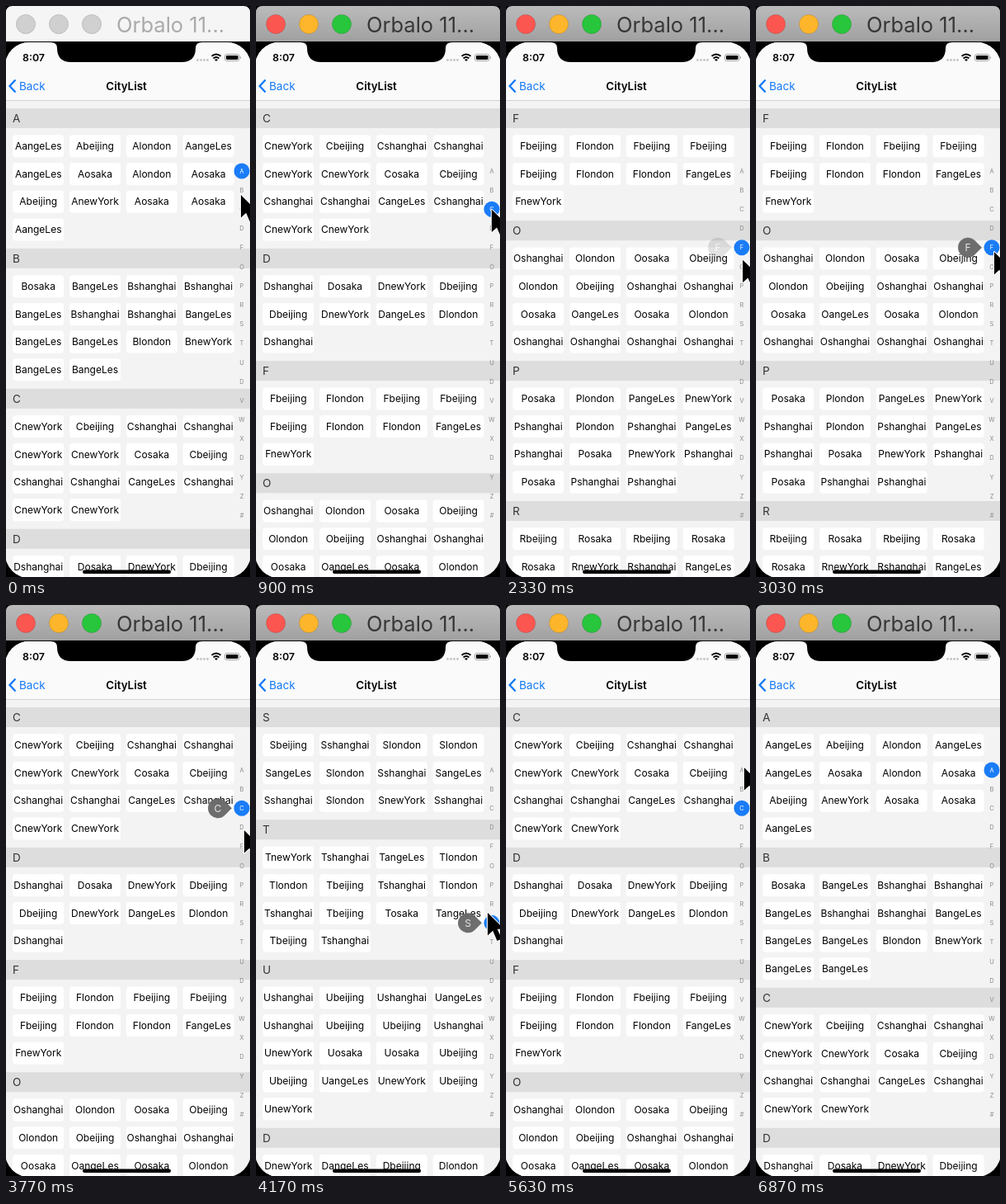
Write an HTML page that moves like this. It is 296 px wide and 692 px high and loops after 6910 ms.

```html
<!DOCTYPE html>
<html lang="en">
<head>
<meta charset="utf-8">
<title>CityList</title>
<style>
  html, body { margin: 0; height: 100%; overflow: hidden; background: #000; }
  svg { display: block; font-family: Inter, Roboto, "Liberation Sans", sans-serif; }
  .mid { text-anchor: middle; }
  .card { font-size: 12px; fill: #000; }
  .head { font-size: 13.5px; fill: #333; }
  .index { font-size: 7.5px; fill: #8b8b8f; }
  .bold { font-weight: 600; }
</style>
</head>
<body>
<svg width="296" height="692" viewBox="0 0 296 692">
  <defs>
    <linearGradient id="active" x2="0" y2="1">
      <stop stop-color="#bcbbbc"/><stop offset="1" stop-color="#a1a0a1"/>
    </linearGradient>
    <clipPath id="phone"><rect x="-1" y="44" width="298" height="649" rx="29"/></clipPath>
  </defs>

  <path id="bar" d="M0 43V8Q0 0 8 0H288Q296 0 296 8V43Z"/>
  <g id="lights"></g>
  <text id="caption" x="134" y="32" font-size="25.5">Orbalo 11...</text>

  <g clip-path="url(#phone)">
    <rect y="44" width="296" height="648" fill="#f3f3f4"/>
    <g id="list"></g>
    <rect y="44" width="296" height="70" fill="#fafafa"/>
    <rect y="114" width="296" height="1" fill="#d2d2d3"/>
    <path d="M54 44Q62 44 62 51Q62 68 79 68H213Q230 68 230 51Q230 44 238 44Z"/>
    <text class="mid bold" x="33.5" y="66.7" font-size="12.4">8:07</text>
    <path d="M232.5 65.5H245" stroke="#c4c4c4" stroke-width="2.8" stroke-linecap="round" stroke-dasharray="0 4"/>
    <path d="M249.5 60.8Q255 56 260.5 60.8M251.6 63.4Q255 60.6 258.4 63.4" fill="none" stroke="#000" stroke-width="1.9"/>
    <path d="M253 65Q255 63.5 257 65L255 67Z"/>
    <rect x="265.5" y="58.5" width="17.5" height="8" rx="2.4" fill="none" stroke="#999" stroke-width=".9"/>
    <rect x="267" y="60" width="14.5" height="5" rx="1.2"/>
    <path d="M284 61Q286 62.5 284 64Z" fill="#999"/>
    <path d="M11.5 89.5L4.5 97L11.5 104.5" fill="none" stroke="#1479f7" stroke-width="2.3"/>
    <text x="16" y="102" font-size="13.5" fill="#1479f7">Back</text>
    <text class="mid bold" x="146" y="102" font-size="13.4">CityList</text>
    <circle id="dot" cx="286" r="9.5" fill="#1a7cf7"/>
    <g id="index"></g>
    <g id="bubble">
      <path d="M274 0L265.5 -8.5A12 12 0 1 0 265.5 8.5Z" fill="#696969" fill-opacity=".96"/>
      <text id="letter" class="mid" x="257" y="4.3" font-size="12" fill="#e6e6e6"></text>
    </g>
    <rect x="93" y="683.5" width="107" height="4.4" rx="2.2"/>
  </g>
  <path id="cursor" d="M0 0V27.5L6.3 21.8L11.5 34L17 31.7L11.8 19.8H20Z"
        stroke="#fff" stroke-width="2" stroke-linejoin="round" paint-order="stroke"/>
</svg>

<script>
const LOOP = 6910, FADE = 350, LAG = 60, ACTIVATE = 200;
const FIRST_Y = 200, PITCH = 23.17;
const INDEX = [...'ABCDFOPRSTUDVWXDYZ#'];
const CITY = { a: 'angeLes', b: 'beijing', l: 'london', n: 'newYork', o: 'osaka', s: 'shanghai' };
const SECTIONS = [
  'ablaaolobnooa', 'oassassaaalnaa', 'nbssnnobssasnn', 'sonbbnals', 'blbbbllan', 'sloblbssoaolssss',
  'olanslsasonsoss', 'boboonsa', 'bsllalsaslns', 'nsallbslsboabs', 'sbsasbbsnoobbanbn', 'nabl',
];
// [time, x, y] of the pointer tip
const PATH = [
  [0, 285, 229], [1150, 286, 249], [1400, 286, 250], [1780, 286, 293], [2050, 286, 294],
  [2550, 288, 317], [2750, 288, 318], [3030, 289, 298], [3450, 289, 249], [3700, 289, 253],
  [3770, 289, 273], [4100, 282, 383], [4170, 281, 373], [5000, 286, 247], [5630, 289, 197],
  [5950, 288, 200], [6280, 302, 192],
];
// [press, release]
const TOUCHES = [[230, 500], [1150, 1400], [1850, 2050], [2550, 4170], [5000, 5180], [5750, 5930]];

const $ = id => document.getElementById(id);
const set = (el, attrs) => { for (const k in attrs) el.setAttribute(k, attrs[k]); };
function add(parent, tag, attrs, text = '') {
  const el = document.createElementNS('http://www.w3.org/2000/svg', tag);
  set(el, attrs);
  el.textContent = text;
  return $(parent).appendChild(el);
}

const offsets = [];
let headY = 136;
SECTIONS.forEach((codes, s) => {
  offsets.push(headY - 136);
  add('list', 'rect', { y: headY - 12, width: 296, height: 24, fill: '#dddddd' });
  add('list', 'text', { class: 'head', x: 8, y: headY + 5 }, INDEX[s]);
  [...codes].forEach((code, i) => {
    const x = 39.2 + 68.8 * (i % 4), y = headY + 33.8 + 33.7 * Math.floor(i / 4);
    add('list', 'rect', { x: x - 31, y: y - 13.5, width: 62, height: 27, rx: 4, fill: '#fff' });
    add('list', 'text', { class: 'card mid', x, y: y + 4.2 }, INDEX[s] + CITY[code]);
  });
  headY += 35.1 + 33.7 * Math.ceil(codes.length / 4);
});

const letters = INDEX.map((c, i) =>
  add('index', 'text', { class: 'index mid', x: 286, y: FIRST_Y + PITCH * i + 2.8 }, c));
const lights = ['#fc5650', '#fdb62b', '#28c63c'].map((color, i) => ({
  color, el: add('lights', 'circle', { cx: 24 + 40 * i, cy: 22, r: 11.6, stroke: '#0002' }),
}));

function pointer(t) {
  const k = PATH.findIndex(p => p[0] > t);
  if (k < 0) return PATH[PATH.length - 1].slice(1);
  const a = PATH[k - 1], b = PATH[k];
  const u = (t - a[0]) / (b[0] - a[0]), e = u * u * (3 - 2 * u);
  return [1, 2].map(i => a[i] + (b[i] - a[i]) * e);
}

// The selection trails the pointer while pressed and stays after release.
function touchState(t) {
  const touch = TOUCHES.filter(p => p[0] <= t).pop();
  if (!touch) return { pick: 0, alpha: 0 };
  const y = pointer(Math.min(t, touch[1]) - LAG)[1];
  return {
    pick: Math.round((y - FIRST_Y) / PITCH),
    alpha: Math.max(0, Math.min(1, 1 - (t - touch[1]) / FADE)),
  };
}

function draw() {
  const t = (performance.now() - start) % LOOP, on = t >= ACTIVATE;
  set($('bar'), { fill: on ? 'url(#active)' : '#f5f5f5' });
  set($('caption'), { fill: on ? '#373737' : '#aaaaaa' });
  lights.forEach(({ el, color }) => set(el, { fill: on ? color : '#d0d0d0' }));

  const { pick, alpha } = touchState(t), y = FIRST_Y + PITCH * pick;
  set($('list'), { transform: `translate(0 ${-offsets[pick]})` });
  set($('dot'), { cy: y });
  letters.forEach((el, i) => el.style.fill = i === pick ? '#fff' : '');
  set($('bubble'), { transform: `translate(0 ${y})`, opacity: alpha });
  $('letter').textContent = INDEX[pick];
  set($('cursor'), { transform: `translate(${pointer(t)})` });
  requestAnimationFrame(draw);
}
const start = performance.now();
draw();
</script>
</body>
</html>
```
